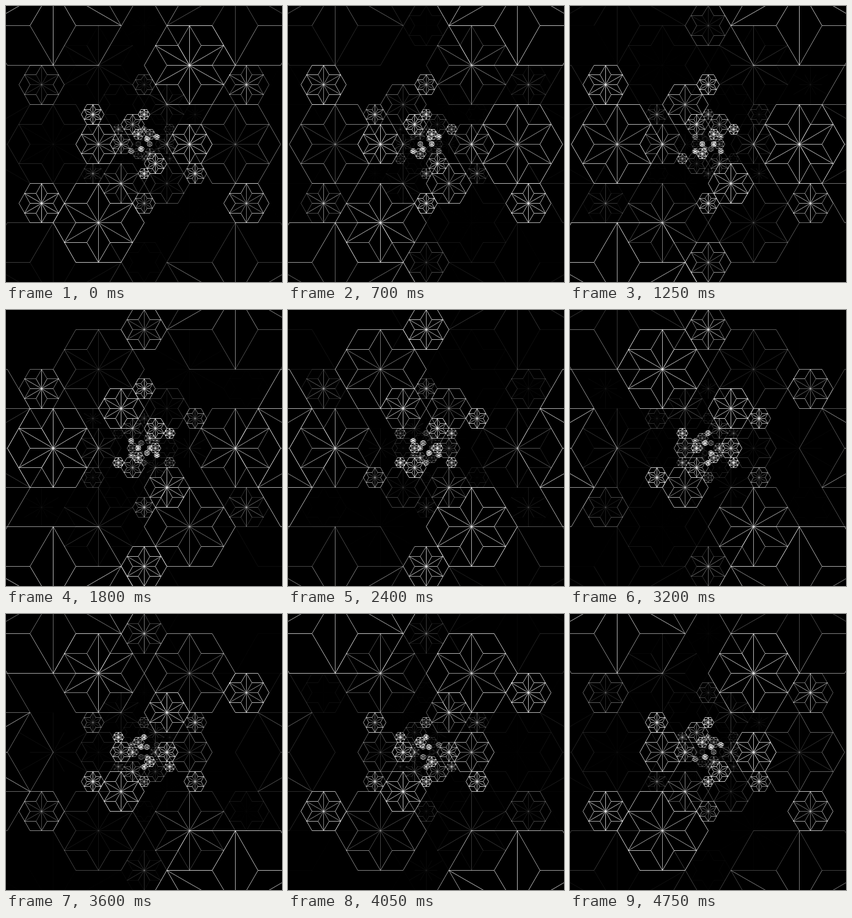
These frames come from a looping animation (500 px wide and 500 px high, 4.8 s). An HTML page with a canvas:

```html
<!DOCTYPE html>
<html lang="en">
<head>
<meta charset="utf-8">
<title>Hexagon stars</title>
<style>
  html, body { margin: 0; width: 100%; height: 100%; overflow: hidden; background: #000; }
  canvas { display: block; }
</style>
</head>
<body>
<canvas id="stage" width="500" height="500"></canvas>
<script>
const ctx = document.getElementById('stage').getContext('2d');
const LOOP = 4800;
const STEP = 50;
const MID = 250;
const BASE = 41.25;        // reference radius
const RING_DELAY = 1200;   // per doubling of radius
const TURN_DELAY = 1420;   // per 60 degrees clockwise
const ROOT3 = Math.sqrt(3);

const polar = (x, y, r, degrees) => {
  const a = degrees * Math.PI / 180;
  return [x + r * Math.cos(a), y - r * Math.sin(a)];
};

// Pixel centres keep level and upright lines one pixel wide.
const snap = point => point.map(v => Math.floor(v + 1e-6) + 0.5);

function polygon(path, points) {
  points.forEach(([x, y], i) => i ? path.lineTo(x, y) : path.moveTo(x, y));
  path.closePath();
}

function makeHexagon(distance, angle, r) {
  const [x, y] = polar(MID, MID, distance, angle);
  const centre = snap([x, y]);
  const outline = new Path2D();
  const star = new Path2D();
  const rays = new Path2D();
  const corners = [];
  const starPoints = [];
  for (let a = 0; a < 360; a += 60) {
    const inner = snap(polar(x, y, r / 2, a));
    const tip = snap(polar(x, y, r * ROOT3 / 2, a + 30));
    corners.push(snap(polar(x, y, r, a)));
    starPoints.push(inner, tip);
    for (const end of [inner, tip]) {
      rays.moveTo(...centre);
      rays.lineTo(...end);
    }
  }
  polygon(outline, corners);
  polygon(star, starPoints);
  const peak = 3790 + TURN_DELAY * (240 - angle) / 60 + RING_DELAY * Math.log2(r / BASE);
  // The rim leads the glow and the centre follows.
  return [
    { path: outline, peak: peak - 200 },
    { path: star, peak: peak - 150 },
    { path: rays, peak: peak + 250 }
  ];
}

const layers = [];
for (let r = BASE * 4; r > 5; r /= 2) {
  for (let i = 0; i < 6; i++) {
    layers.push(...makeHexagon(2 * r, 240 - 60 * i, r));
    if (r <= BASE) layers.push(...makeHexagon(3 * ROOT3 * r, 210 - 60 * i, r));
  }
}

const glow = offset => ((1 + Math.cos(2 * Math.PI * offset / LOOP)) / 2) ** 1.5;

function draw(time) {
  ctx.globalAlpha = 1;
  ctx.fillStyle = '#000';
  ctx.fillRect(0, 0, 500, 500);
  ctx.strokeStyle = '#fff';
  ctx.lineWidth = 0.8;
  for (const { path, peak } of layers) {
    ctx.globalAlpha = glow(time - peak);
    ctx.stroke(path);
  }
}

const start = performance.now();
function tick() {
  const elapsed = (performance.now() - start) % LOOP;
  draw(Math.floor(elapsed / STEP) * STEP);
  requestAnimationFrame(tick);
}
tick();
</script>
</body>
</html>
```
